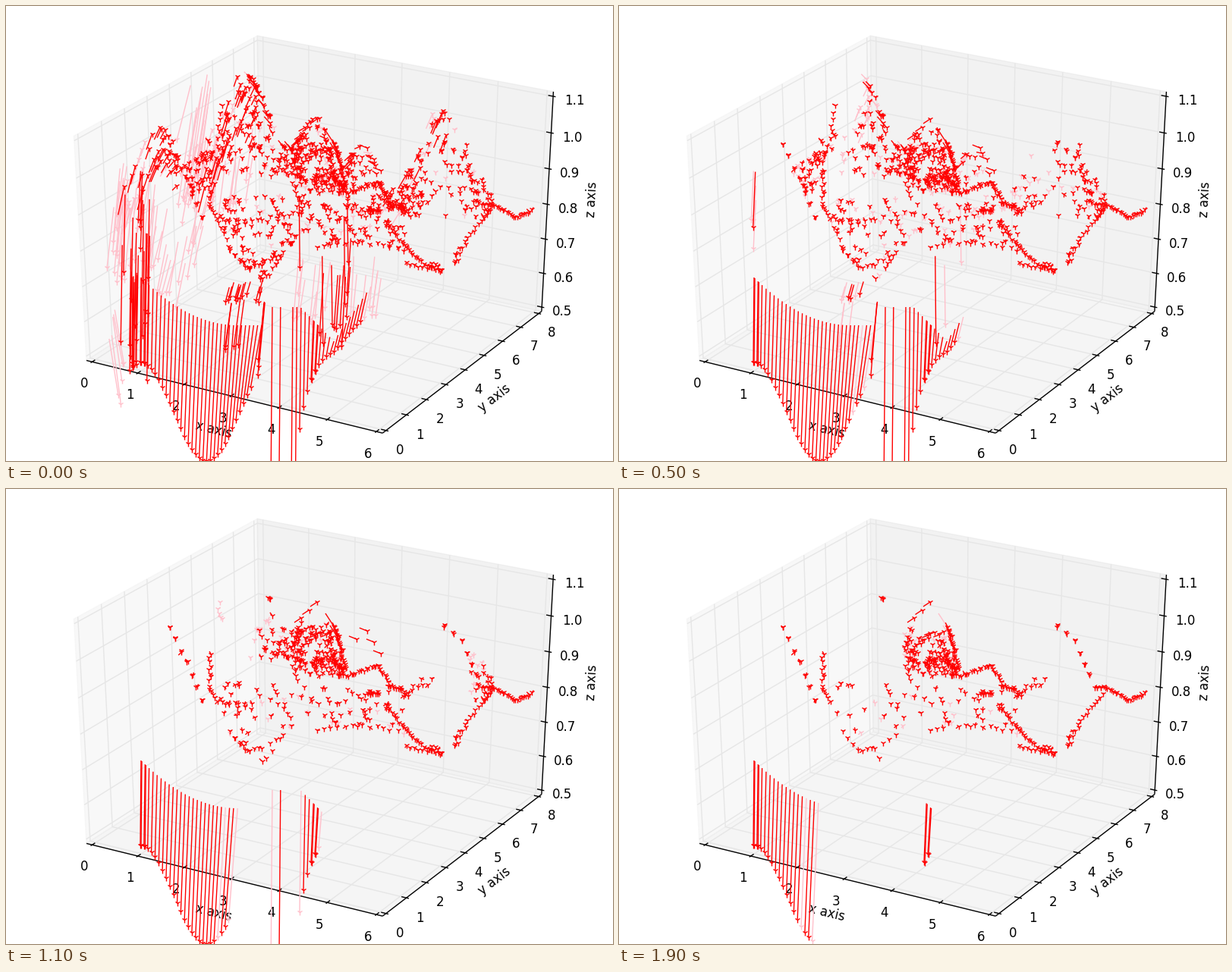
A matplotlib script that plays this animation: 800x600 px, repeating every 2000 ms.

```python
import numpy as np
import matplotlib.pyplot as plt
from matplotlib.animation import FuncAnimation
from matplotlib.collections import LineCollection

W, H = 800, 600
FRAMES, STEP = 20, 100
STAY = 30
BLINK = 8

plt.rcParams["font.family"] = "DejaVu Sans"
rng = np.random.default_rng(4)

fig = plt.figure(figsize=(W / 100, H / 100), dpi=100, facecolor="white")
ax = fig.add_axes([0, 0, 1, 1])
ax.set_xlim(0, W)
ax.set_ylim(H, 0)
ax.axis("off")


# ---------- perspective box ----------
AZIM, ELEV, DIST = np.radians(-60), np.radians(30), 10
N = np.array([np.cos(AZIM) * np.cos(ELEV), np.sin(AZIM) * np.cos(ELEV), np.sin(ELEV)])
U = np.array([-np.sin(AZIM), np.cos(AZIM), 0])
V = np.cross(N, U)
E = 0.5 + 1 / 48
DELTA = 1 / 12
TICK_PAD, NAME_PAD = 0.571 * DELTA, 1.238 * DELTA


def proj(p):
    """Box coordinates (-0.5 to 0.5) to stage pixels."""
    p = np.asarray(p, float)
    depth = DIST - p @ N
    x = (p @ U / depth + 0.095) / 0.185 * W
    y = H - (p @ V / depth + 0.095) / 0.185 * H
    return np.stack([x, y], -1)


def line(pts, color, z):
    ax.plot(*proj(pts).T, color=color, lw=1, zorder=z, solid_capstyle="butt")


def pane(pts, grey):
    ax.fill(*proj(pts).T, fc=(grey,) * 3, ec=(grey,) * 3, alpha=0.5, lw=1, zorder=0)


def axis(index, corner, across, name, labels):
    """Axis line through `corner` along `index`, with ticks pointing `across`."""
    corner = np.array(corner, float)
    others = np.arange(3) != index
    side = np.sign(corner) * others

    def at(a, pad=0):
        p = corner + side * pad
        p[index] = a
        return p

    ends = np.array([at(-E), at(E)])
    line(ends, "black", 3)
    (x0, y0), (x1, y1) = proj(ends)
    x, y = proj(at(0, NAME_PAD))
    ax.text(x, y, name, fontsize=12, ha="center", va="center", zorder=3,
            rotation=np.degrees(np.arctan2(y0 - y1, x1 - x0)))
    for a, s in zip(np.linspace(-0.5, 0.5, len(labels)), labels):
        mark = np.array([at(a), at(a)])
        mark[:, across] += np.array([0.1, -0.2]) * DELTA * side[across]
        line(mark, "black", 3)
        x, y = proj(at(a, TICK_PAD))
        ax.text(x, y, s, fontsize=12, ha="center", va="top", zorder=3)


def draw_box():
    pane([(-E, -E, -E), (-E, E, -E), (-E, E, E), (-E, -E, E)], 0.95)
    pane([(-E, E, -E), (E, E, -E), (E, E, E), (-E, E, E)], 0.90)
    pane([(-E, -E, -E), (E, -E, -E), (E, E, -E), (-E, E, -E)], 0.925)
    grid = (0.9, 0.9, 0.9)
    for a in np.linspace(-0.5, 0.5, 7):
        line([(a, -E, -E), (a, E, -E), (a, E, E)], grid, 1)
        line([(-E, -E, a), (-E, E, a), (E, E, a)], grid, 1)
    for a in np.linspace(-0.5, 0.5, 9):
        line([(E, a, -E), (-E, a, -E), (-E, a, E)], grid, 1)
    axis(0, (0, -E, -E), 1, "x axis", [str(i) for i in range(7)])
    axis(1, (E, 0, -E), 0, "y axis", [str(i) for i in range(9)])
    axis(2, (E, E, 0), 0, "z axis", [f"{0.5 + i / 10:.1f}" for i in range(7)])


# ---------- arrows ----------
parts = []


def add(tails, tips, life, phase=0.5, period=2):
    """Red through frame `life`, pink for one more and whenever the phase comes up."""
    n = len(tips)
    cols = [np.broadcast_to(c, n) for c in (np.round(life), phase, period)]
    parts.append(np.column_stack([tails, tips, *cols]))


def chain(n, *keys, life=STAY, tail=None, jit=1.0):
    """Arrows strung along a line through a few key points."""
    p = np.array(keys, float)
    s = np.r_[0, np.cumsum(np.hypot(*np.diff(p, axis=0).T))]
    t = np.linspace(0, s[-1], n)
    tips = np.stack([np.interp(t, s, p[:, k]) for k in (0, 1)], -1)
    tips += rng.normal(0, jit, (n, 2))
    back = rng.uniform(-4, 4, (n, 2)) if tail is None else np.array(tail)
    add(tips + back, tips, life)


def scatter(n, x0, x1, top, bottom, life, tail=None):
    """Arrows strewn between two curves; life and tail follow the place."""
    x = np.sort(rng.uniform(x0, x1, n))
    a = top(x) if callable(top) else top
    b = bottom(x) if callable(bottom) else bottom
    y = a + (b - a) * rng.random(n)
    tips = np.stack([x, y], -1)
    if tail is None:
        back = rng.uniform(-4, 4, (n, 2))
    else:
        u = ((x - x0) / (x1 - x0))[:, None]
        back = tail[0] + (np.array(tail[1]) - tail[0]) * u
        back = back * rng.uniform(0.6, 1.1, (n, 1))
    keep = life(x, y) if callable(life) else life
    add(tips + back, tips, keep + rng.uniform(-1, 1, n), np.arange(n), BLINK)


def rain(n, x, y, drift, drop, life):
    """Long falling arrows whose tops lie in the box x by y."""
    tops = np.stack([rng.uniform(*x, n), rng.uniform(*y, n)], -1)
    fall = np.stack([np.full(n, drift), rng.uniform(*drop, n)], -1)
    add(tops, tops + fall, np.round(rng.uniform(*life, n)))


def bumps(x, base, peaks):
    return base + sum(h * np.exp(-((x - c) / w) ** 2) for c, w, h in peaks)


def ridge(x):
    return bumps(x, 265, [(200, 38, -112), (312, 55, -182), (408, 28, -115),
                          (470, 25, -88), (575, 46, -135)])


def floor(x):
    return bumps(x, 275, [(335, 40, 85), (440, 55, 42), (510, 30, 35), (565, 35, 70)])


def below(d):
    return lambda x: np.minimum(ridge(x) + d, floor(x))


def thin(x, y):
    """Most go early, a few stay for good."""
    return 34 * rng.random(len(x)) ** 1.6


def curtains():
    i = np.arange(31)
    x = 178 + 5.3 * i
    top = 421 - 63 * (1 - np.minimum(i, 24) / 24) ** 2
    tip = 535 - 65 * np.cos(np.pi * i / 18)
    add(np.c_[x, top], np.c_[177 + 4.85 * i, tip], 34 - i, i - 32, 40)
    add(np.c_[x, top][:2] + 1, np.c_[x, tip][:2], STAY)

    for k, life in ((0, 10), (2, 12), (5, 8), (6, 6)):
        x = 351 + 5.4 * k
        add([(x, 397)], [(x - 2, 640)], life)

    k = np.arange(19)
    x = 389 + 5.4 * k
    top = np.minimum(398 + 5.5 * k, 506 - 8 * k)
    tip = 450 + 108 * np.exp(-k / 3.2) - 5 * np.maximum(k - 9, 0)
    life = np.where(k < 3, 10 + 3 * k, np.where(k < 5, STAY, 10 - 0.9 * (k - 5)))
    ends = np.c_[x, top], np.c_[x - 2 - 0.4 * k, tip]
    add(*ends, life)
    add(*(e[3:5] + 1 for e in ends), STAY)


def falling():
    rain(16, (150, 190), (230, 370), -2, (95, 130), (0, 1))
    rain(5, (164, 174), (350, 358), -1, (110, 125), (1, 4))
    rain(4, (174, 184), (210, 330), -3, (40, 90), (3, 5))
    rain(12, (288, 355), (360, 372), -5, (16, 20), (0, 5))
    rain(4, (285, 316), (387, 393), -8, (55, 62), (3, 4))
    rain(3, (336, 350), (388, 392), -8, (40, 97), (2, 6))
    rain(5, (385, 450), (250, 345), 1, (70, 130), (3, 5))
    rain(8, (405, 465), (300, 360), -5, (60, 100), (-1, 0))
    # short-lived veils
    rain(22, (140, 200), (205, 270), -9, (45, 110), (-1, -1))
    rain(16, (240, 275), (90, 190), -18, (70, 140), (-1, -1))
    rain(12, (275, 330), (160, 215), -9, (50, 80), (-1, -1))
    rain(14, (195, 265), (240, 350), -12, (40, 70), (-1, -1))
    rain(16, (365, 500), (330, 390), -7, (40, 80), (-1, -1))
    rain(5, (130, 150), (400, 440), 12, (50, 100), (-1, -1))


def slopes():
    # steep flanks
    scatter(48, 155, 225, ridge, below(80), lambda x, y: (x - 190) / 25,
            ((-8, 38), (-8, 8)))
    scatter(48, 252, 330, ridge, below(90), lambda x, y: (x - 275) / 14,
            ((-10, 42), (-6, 12)))
    scatter(22, 500, 580, ridge, below(45), 0, ((-14, 20), (-8, 22)))
    # left hill
    scatter(75, 205, 285, below(8), below(55), lambda x, y: (x - 205) / 9 + 1)
    # back peak
    scatter(125, 283, 388, ridge, 224,
            lambda x, y: (x - 270) / 6 - np.maximum(190 - y, 0) / 12)
    scatter(22, 320, 378, ridge, below(10), lambda x, y: (x - 300) / 8,
            ((-8, -8), (-8, -10)))
    # centre
    scatter(150, 376, 446, ridge, 246, lambda x, y: (y - 150) / 2.5)
    scatter(45, 385, 450, 222, 246, STAY)
    scatter(14, 380, 432, ridge, below(12), 3, ((-9, 10), (-9, -8)))
    scatter(14, 448, 495, ridge, below(12), 4, ((-9, 12), (-9, -9)))
    scatter(100, 440, 548, below(10), 271, lambda x, y: 6 * rng.random(len(x)))
    # valley
    scatter(100, 285, 400, 250, floor, thin)
    scatter(28, 290, 385, lambda x: floor(x) - 25, floor, 1)
    scatter(80, 395, 525, 262, floor, thin)
    # right hill
    scatter(90, 528, 640, ridge, 278,
            lambda x, y: (x - 525) / 9 - np.maximum(210 - y, 0) / 15)


def lasting():
    for _ in range(2):
        chain(7, (217, 181), (238, 227), (258, 278))
        chain(6, (578, 181), (600, 197), (619, 245))
    chain(3, (346, 142), (348, 143))
    chain(14, (270, 217), (266, 265), (279, 280))
    chain(11, (280, 281), (318, 287), life=np.linspace(12, 16, 11), jit=3)
    chain(10, (280, 285), (297, 325), (320, 345), life=np.linspace(4, 14, 10))
    chain(9, (294, 318), (313, 343), (340, 341), (365, 324))
    chain(3, (389, 170), (410, 149), tail=(-9, 6), jit=0)
    chain(14, (433, 182), (443, 213), tail=(-3, -6))
    chain(7, (398, 205), (410, 190), (428, 190), tail=(-8, 3))
    chain(2, (432, 181), (438, 197), life=18, tail=(-11, -17), jit=0)
    chain(4, (462, 198), (476, 187), (494, 217), life=11, tail=(-10, -4), jit=0)
    chain(30, (452, 246), (490, 231), (508, 260), (530, 270))
    chain(10, (474, 270), (491, 270))
    chain(14, (505, 258), (530, 268), (557, 254), jit=4)
    chain(13, (412, 318), (440, 310), (515, 318), jit=2)
    chain(28, (500, 283), (517, 305), (550, 340), (575, 349))
    chain(13, (527, 338), (575, 349), (560, 338))
    chain(9, (588, 337), (604, 316), jit=2)
    chain(10, (605, 310), (624, 284), (637, 270))
    chain(27, (625, 262), (640, 260), (672, 278), (693, 270))


draw_box()
curtains()
falling()
slopes()
lasting()

data = np.vstack(parts)
segs = data[:, :4].reshape(-1, 2, 2)
life, phase, period = data[:, 4:].T

layers = []
for color, z in (("pink", 4), ("red", 5)):
    shafts = LineCollection([], colors=color, linewidths=1, zorder=z)
    ax.add_collection(shafts, autolim=False)
    heads, = ax.plot([], [], ls="", marker="1", ms=5.5, mew=1, color=color, zorder=z)
    layers.append((shafts, heads))


def update(t):
    gap = (phase + t) % period == 0
    pink = (t == life + 1) | ((t <= life) & gap)
    red = (t <= life) & ~gap
    for (shafts, heads), on in zip(layers, (pink, red)):
        shafts.set_segments(segs[on])
        heads.set_data(*segs[on, 1].T)
    return [a for pair in layers for a in pair]


anim = FuncAnimation(fig, update, frames=FRAMES, interval=STEP, repeat=True,
                     init_func=lambda: update(0), blit=False)
plt.show()
```
